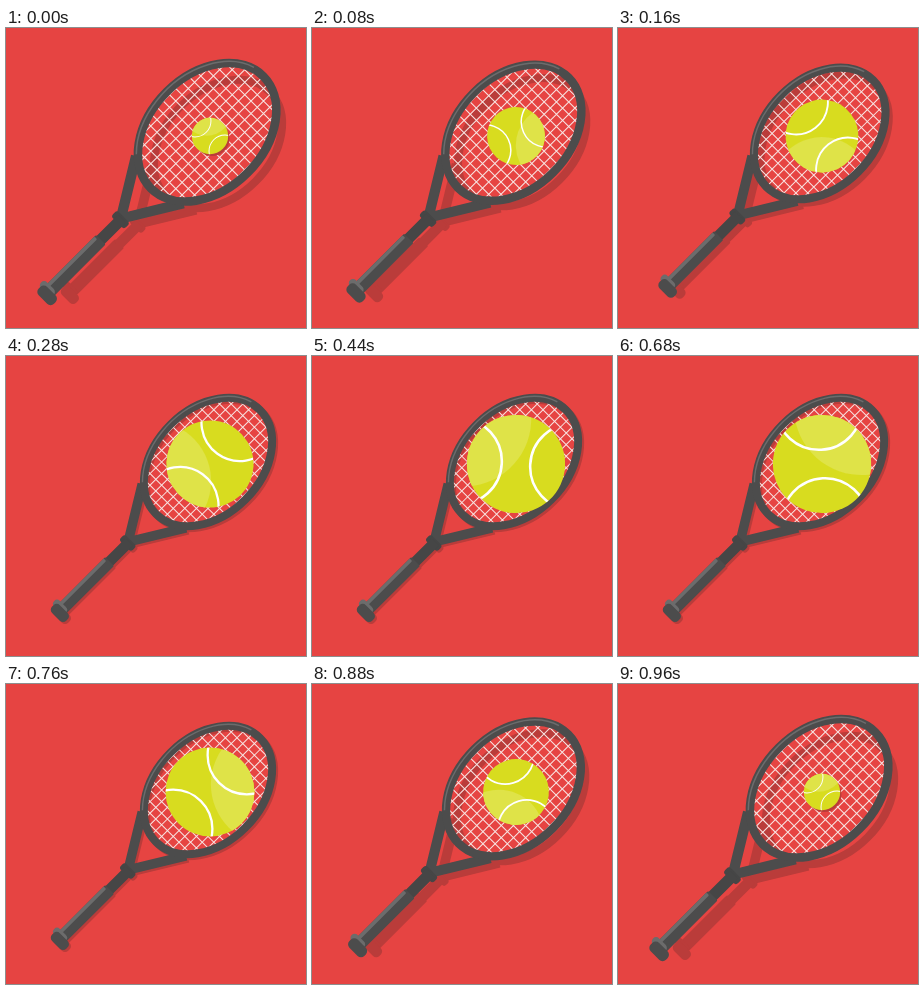
An HTML page with a canvas for the animation above (1000 ms loop, 300x300 px).

```html
<!DOCTYPE html>
<html lang="en">
<head>
<meta charset="utf-8">
<title>Tennis</title>
<style>
  html, body { margin: 0; height: 100%; overflow: hidden; background: #e64442; }
  canvas { display: block; width: 100vw; height: 100vh; }
</style>
</head>
<body>
<canvas id="stage" width="300" height="300"></canvas>
<script>
const ctx = document.getElementById('stage').getContext('2d');
const TAU = Math.PI * 2, RAD = Math.PI / 180;
const STEP = 40, STEPS = 25, CYCLE = 24, PEAK = 15;
const RED = '#e64442', SHADE = '#ba3c3a', DARK = '#4c4c4c', SLEEVE = '#464646', LIGHT = '#6c6c6c';
const LIME = '#d8dc1f', LIME_LIGHT = '#dfe348';

const clamp = x => Math.min(1, Math.max(0, x));
const smooth = x => (x = clamp(x), x * x * (3 - 2 * x));
// Fast start that settles into a steady drift; w sets the share of the fast part.
const launch = (u, w) => w * (1 - (1 - u) ** 4) + (1 - w) * u;

function box(x0, y0, x1, y1, r, color) {
  ctx.fillStyle = color;
  ctx.beginPath();
  ctx.roundRect(x0, y0, x1 - x0, y1 - y0, r);
  ctx.fill();
}

function disc(x, y, r, color) {
  ctx.fillStyle = color;
  ctx.beginPath();
  ctx.arc(x, y, r, 0, TAU);
  ctx.fill();
}

function ring(a, b, width, color, from = 0, to = TAU) {
  ctx.strokeStyle = color;
  ctx.lineWidth = width;
  ctx.beginPath();
  ctx.ellipse(0, 0, a, b, 0, from, to);
  ctx.stroke();
}

function strings() {
  ctx.save();
  ctx.beginPath();
  ctx.ellipse(0, 0, 73, 53, 0, 0, TAU);
  ctx.clip();
  ctx.strokeStyle = '#f8e4e2';
  ctx.lineWidth = 1;
  ctx.beginPath();
  for (let d = -73.8; d <= 74; d += 8.2) {
    ctx.moveTo(d, -54);
    ctx.lineTo(d, 54);
    ctx.moveTo(-75, d);
    ctx.lineTo(75, d);
  }
  ctx.stroke();
  ctx.restore();
}

// Local x runs from the head centre down the handle, local y to the upper left.
function silhouette(color, sleeve, light) {
  ctx.strokeStyle = color;
  ctx.lineWidth = 9.5;
  ctx.lineJoin = 'round';
  ctx.beginPath();
  ctx.moveTo(62, 31);
  ctx.lineTo(113, 0);
  ctx.lineTo(62, -31);
  ctx.stroke();
  ring(73.5, 53, 8, color);
  box(110, -9, 118, 8, 3, sleeve);
  box(112, -6, 142, 4.5, 1, sleeve);
  box(140, -7, 208, 5.5, 1, color);
  box(142, 2, 207, 5.5, 1, light);
  box(203, -6, 211, 10.5, 4, light);
  box(206, -12, 217, 8, 4.5, color);
}

function place(x, y, draw) {
  ctx.save();
  ctx.translate(x, y);
  ctx.rotate(135 * RAD);
  draw();
  ctx.restore();
}

function racket(lift) {
  const off = 2 + 8 * lift;
  place(202 + off, 106 + off, () => silhouette(SHADE, SHADE, SHADE));

  const scale = 1 + 0.08 * lift;
  ctx.save();
  ctx.translate(213, 127);
  ctx.scale(scale, scale);
  ctx.translate(-213, -127);
  place(202, 106, () => {
    strings();
    silhouette(DARK, SLEEVE, LIGHT);
    ring(75, 54.5, 1.4, LIGHT, 0.2 * Math.PI, 0.93 * Math.PI);
  });
  ctx.restore();
}

function ball(r, angle) {
  ctx.save();
  ctx.translate(204, 108);
  ctx.rotate(angle * RAD);
  ctx.scale(r, r);
  disc(0, 0, 1, LIME);
  ctx.beginPath();
  ctx.arc(0, 0, 1, 0, TAU);
  ctx.clip();
  disc(1.41 * Math.cos(218 * RAD), 1.41 * Math.sin(218 * RAD), 1.38, LIME_LIGHT);
  ctx.strokeStyle = '#fff';
  ctx.lineWidth = 0.052;
  for (const side of [-1, 1]) {
    ctx.beginPath();
    ctx.arc(1.17 * side, 0, 0.88, 0, TAU);
    ctx.stroke();
  }
  ctx.restore();
}

function render(now) {
  const n = Math.floor(now / STEP) % STEPS;
  const rising = n <= PEAK;
  const height = rising
    ? launch(n / PEAK, 0.57)
    : launch((CYCLE - n) / (CYCLE - PEAK), 0.48);
  const turns = rising ? height : 2 - height;
  const lift = Math.max(1 - smooth(n / 6.5), smooth((n - 19) / 5));

  ctx.fillStyle = RED;
  ctx.fillRect(0, 0, 300, 300);
  racket(lift);
  disc(206, 110.5, 17.5, SHADE);
  ball(18.2 + 35 * height, 45 + 360 * turns);
}

let start;
function tick(now) {
  start ??= now;
  render(now - start);
  requestAnimationFrame(tick);
}
render(0);
requestAnimationFrame(tick);
</script>
</body>
</html>
```
